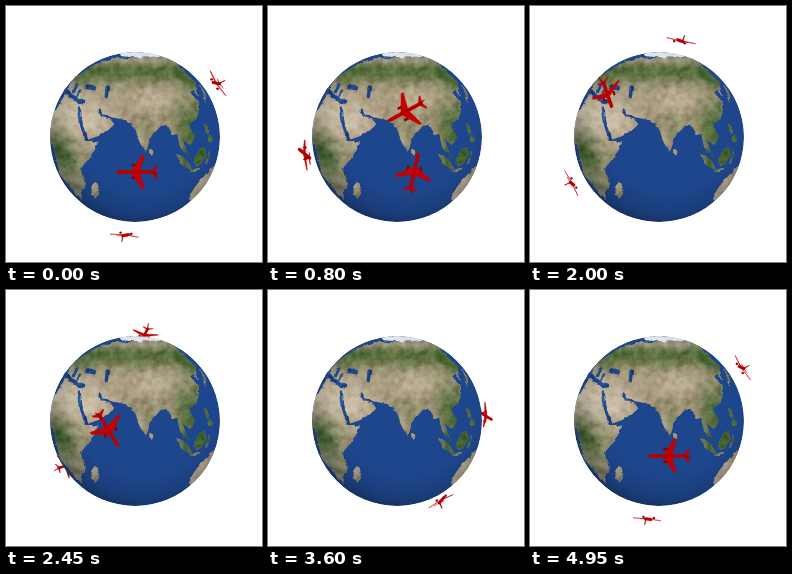
These frames come from a looping animation (256x256 px, 5 s). An HTML page:

```html
<!DOCTYPE html>
<html lang="en">
<head>
<meta charset="utf-8">
<title>Planes around the globe</title>
<style>
html, body { margin: 0; width: 100%; height: 100%; overflow: hidden; background: #fff; }
svg { display: block; width: 100vw; height: 100vh; }
</style>
</head>
<body>
<svg viewBox="0 0 256 256">
  <defs>
    <clipPath id="disc"><circle cx="129" cy="131" r="85"/></clipPath>
    <clipPath id="coast"></clipPath>
    <radialGradient id="shade" gradientUnits="userSpaceOnUse" cx="138" cy="114" r="106">
      <stop offset=".68" stop-color="#0a1428" stop-opacity="0"/>
      <stop offset=".88" stop-color="#0a1428" stop-opacity=".18"/>
      <stop offset="1" stop-color="#0a1428" stop-opacity=".45"/>
    </radialGradient>
    <filter id="soft" x="-30%" y="-30%" width="160%" height="160%"><feGaussianBlur stdDeviation="1.6"/></filter>
    <filter id="rough" x="40" y="42" width="178" height="178" filterUnits="userSpaceOnUse" color-interpolation-filters="sRGB">
      <feTurbulence type="fractalNoise" baseFrequency=".13" numOctaves="3" seed="4" result="n"/>
      <feDisplacementMap in="SourceGraphic" in2="n" scale="4" xChannelSelector="R" yChannelSelector="G" result="d"/>
      <feColorMatrix in="n" values=".6 0 0 0 .2  .6 0 0 0 .2  .6 0 0 0 .2  0 0 0 0 1"/>
      <feComposite in2="d" operator="in" result="g"/>
      <feBlend in="g" in2="d" mode="soft-light"/>
    </filter>
  </defs>
  <g id="back"></g>
  <g clip-path="url(#disc)">
    <circle cx="129" cy="131" r="85" fill="#1e468c"/>
    <g filter="url(#rough)">
      <g clip-path="url(#coast)"><g id="soil" filter="url(#soft)"></g></g>
      <g id="water" fill="none" stroke="#1e468c" stroke-linecap="round" stroke-linejoin="round"></g>
      <ellipse cx="134" cy="48.5" rx="20" ry="3" fill="#dfe5e8"/>
    </g>
    <circle cx="129" cy="131" r="85" fill="url(#shade)"/>
  </g>
  <g id="front"></g>
</svg>
<script>
const CX = 129, CY = 131, DIST = 360, GLOBE = 82.7, RAD = Math.PI / 180;
const LOOP = 5000, STEP = 50;
const $ = id => document.getElementById(id);

function add(parent, tag, attrs) {
  const el = document.createElementNS('http://www.w3.org/2000/svg', tag);
  for (const k in attrs) el.setAttribute(k, attrs[k]);
  return parent.appendChild(el);
}

// Perspective view: x right, y down, z towards the viewer
function project([x, y, z]) {
  const k = DIST / (DIST - z);
  return [CX + x * k, CY + y * k];
}
const line = pts => 'M' + pts.map(p => p[0].toFixed(2) + ' ' + p[1].toFixed(2)).join('L');
const pairs = list => list.flatMap((n, i) => i % 2 ? [] : [[n, list[i + 1]]]);

// ---- Globe ----
const LON = 72, LAT = 16 * RAD;

function geo([lon, lat]) {
  const a = (lon - LON) * RAD, b = lat * RAD;
  const x = Math.cos(b) * Math.sin(a);
  const y = Math.cos(b) * Math.cos(a) * Math.sin(LAT) - Math.sin(b) * Math.cos(LAT);
  const z = Math.sin(b) * Math.sin(LAT) + Math.cos(b) * Math.cos(a) * Math.cos(LAT);
  if (z < GLOBE / DIST) {
    const r = 92 / Math.hypot(x, y);
    return [CX + x * r, CY + y * r];
  }
  return project([x * GLOBE, y * GLOBE, z * GLOBE]);
}
const trace = list => line(pairs(list).map(geo));

// Key points of the coast, counted in lon, lat
const mainland = [43,12, 51,12, 46,3, 39,-5, 40.5,-15, 35,-22, 28,-33, 12,-17, 9,2, -7,5, -9,45,
  5,60, 25,71, 70,72, 110,76, 180,68, 142,58, 135,44, 128,39, 126,35, 124,40, 118,39, 122,31,
  115,23, 106,20, 109,12, 105,9, 100,13, 103.5,2, 98,9, 97,16.5, 94,16, 91,22.5, 87,21.5, 80,15,
  77.5,8, 73,18, 72,21, 67,25, 57,26.5, 56,26, 59.8,22.5, 52,16, 44,12.7];
// lon, lat, half length, half width, turn
const islands = [[46.8,-18.5,7,2.2,70], [80.8,7.6,1.8,1.1,90], [101,-.5,7.5,1.6,-46], [110,-7.2,5,.9,-8],
  [113.5,.5,5.5,4,40], [121,-2,4,1.3,70], [121.5,15.5,3.5,1.5,-65], [124.5,8.5,3,2,-50],
  [137,36,8,1.6,45], [132,-25,19,13,0]];
// Width in pixels, then the course of the sea
const seas = [[3, 32.5,29.5, 38,20.5, 43,12.5], [3, 48.8,29.3, 51.5,27, 56,26], [5, -2,37, 18,35, 33.5,33.5],
  [2.5, 25,35, 25,40], [2.5, 18,38, 14,44], [4.5, 30,43, 38,43], [3.5, 49.5,45, 51.5,38]];

function islandPath([lon, lat, a, b, turn]) {
  const c = Math.cos(turn * RAD), s = Math.sin(turn * RAD);
  return line(Array.from({ length: 16 }, (_, i) => {
    const u = a * Math.cos(i * Math.PI / 8), v = b * Math.sin(i * Math.PI / 8);
    return geo([lon + u * c - v * s, lat + u * s + v * c]);
  })) + 'Z';
}
add($('coast'), 'path', { d: trace(mainland) + 'Z' + islands.map(islandPath).join('') });
for (const [w, ...course] of seas) add($('water'), 'path', { d: trace(course), 'stroke-width': w });

// Ground colour follows climate: wet tropics, monsoon coast, northern forest, dry belt
const bump = (x, mid, w) => Math.exp(-(((x - mid) / w) ** 2));
const clamp = x => Math.max(0, Math.min(1, x));
const mix = (a, b, k) => a.map((n, i) => n + (b[i] - n) * k);
let seed = 7;
const random = () => (seed = seed * 16807 % 2147483647) / 2147483647;

function groundColour(lon, lat) {
  const east = clamp((lon - 90) / 14);
  const tropics = bump(lat, 1, 10) * Math.max(bump(lon, 20, 19), east);
  const monsoon = .85 * east * bump(lat, 20, 13) + .8 * bump(lon, 128, 14) * bump(lat, 46, 8);
  const forest = .85 * bump(lat, 57, 9) + .5 * bump(lon, 10, 25) * bump(lat, 47, 6);
  const mild = .35 * bump(lat, -18, 12) * bump(lon, 25, 22) + .3 * bump(lon, 80, 9) * bump(lat, 20, 9);
  const green = lat < -12 && lon > 110 ? 0 : clamp(tropics + monsoon + forest + mild + (random() - .5) * .16);
  const sand = bump(lat, 24, 12) * clamp((65 - lon) / 20) + .6 * bump(lat, 37, 6) * bump(lon, 86, 14);
  const dry = mix([172, 157, 130], [203, 190, 167], clamp(sand));
  return mix(mix(dry, [66, 98, 42], green), [150, 152, 138], clamp((lat - 66) / 10));
}
const CELL = 4;
for (let lat = -40; lat < 80; lat += CELL) {
  for (let lon = -20; lon < 176; lon += CELL) {
    const e = lon + CELL * 1.15, n = lat + CELL * 1.15;
    add($('soil'), 'path', {
      d: trace([lon, lat, e, lat, e, n, lon, n]) + 'Z',
      fill: `rgb(${groundColour(lon + CELL / 2, lat + CELL / 2).map(Math.round)})`
    });
  }
}

// ---- Planes ----
// Local points: forward, sideways, up
const mirror = pts => pts.map(([f, s, h]) => [f, -s, h]);
const wing = [[4, 0, 0], [-4, 13.5, .6], [-5.8, 13.5, .6], [-2.2, 0, 0]];
const tail = [[-11, 0, .5], [-14.5, 5.2, .8], [-15.6, 5.2, .8], [-14, 0, .5]];
const fin = [[-9.5, 0, 1], [-13.5, 0, 6], [-15.5, 0, 6], [-14, 0, .5]];
const engine = [[3, 5, -1.4], [.5, 5, -1.4]];
const body = [[13.6, 0, 0], [-13.5, 0, .4]];
// Points, stroke width, colour
const parts = [
  [engine, 2, '#8c0000'], [mirror(engine), 2, '#8c0000'],
  [wing, .4, '#c40000'], [mirror(wing), .4, '#c40000'],
  [tail, .3, '#c40000'], [mirror(tail), .3, '#c40000'],
  [body, 2.8, '#b80000'], [fin, .4, '#a00000']
];

// dir: heading at the nearest point, tilt: orbit offset there, at: time of passing it
const planes = [
  { r: 95, dir: 180, tilt: -16, at: 10 },
  { r: 95, dir: 150, tilt: 8, at: 925 },
  { r: 95, dir: -81, tilt: 10.5, at: 1000 },
  { r: 88, dir: 58, tilt: 13.7, at: 2496 }
];
for (const p of planes) {
  const c = Math.cos(p.dir * RAD), s = Math.sin(p.dir * RAD);
  const st = Math.sin(p.tilt * RAD), ct = Math.cos(p.tilt * RAD);
  p.v = [c, s, 0];
  p.u = [-s * st, c * st, ct];
  p.w = [-s * ct, c * ct, -st];
  p.el = add($('front'), 'g', { 'stroke-linejoin': 'round', 'stroke-linecap': 'round' });
  p.paths = parts.map(([, , col]) => add(p.el, 'path', { fill: col, stroke: col }));
}

function place(p, t) {
  const a = (t - p.at) / LOOP * 2 * Math.PI, c = Math.cos(a), s = Math.sin(a);
  const up = p.u.map((u, i) => u * c + p.v[i] * s);
  const fwd = p.u.map((u, i) => p.v[i] * c - u * s);
  const zoom = DIST / (DIST - up[2] * p.r);
  parts.forEach(([pts, width], n) => {
    const flat = pts.map(([f, w, h]) =>
      project(up.map((u, i) => u * (p.r + h) + fwd[i] * f + p.w[i] * w)));
    p.paths[n].setAttribute('d', line(flat) + 'Z');
    p.paths[n].setAttribute('stroke-width', width * zoom);
  });
  const layer = up[2] * p.r < GLOBE * GLOBE / DIST ? $('back') : $('front');
  if (p.el.parentNode !== layer) layer.appendChild(p.el);
}

let last = -1;
function frame() {
  const t = Math.floor(performance.now() % LOOP / STEP) * STEP;
  if (t !== last) planes.forEach(p => place(p, t));
  last = t;
  requestAnimationFrame(frame);
}
frame();
</script>
</body>
</html>
```
